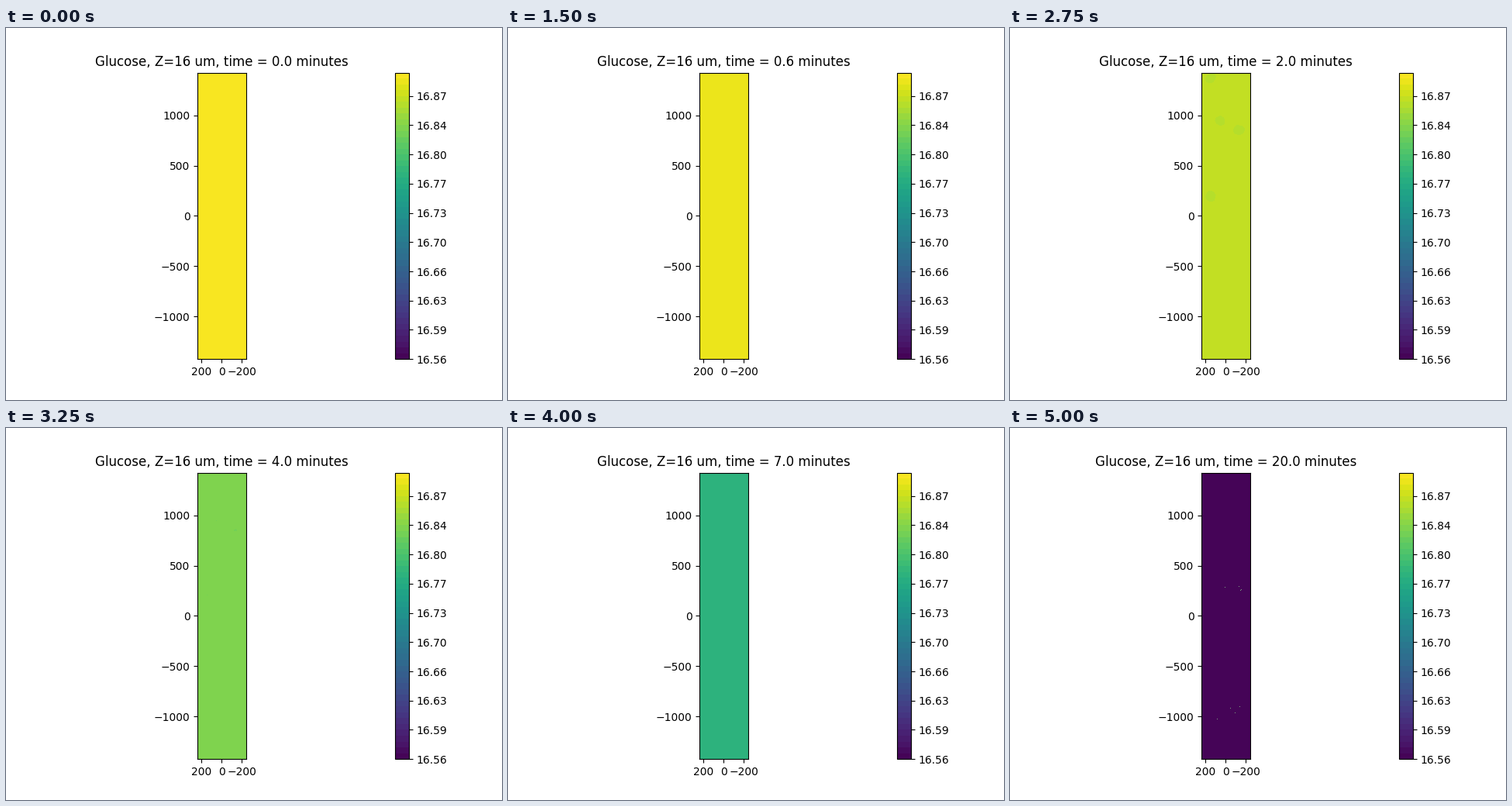
Animation, 640 px wide and 480 px high, one loop 5.25 s. Source, as a matplotlib script:

```python
import numpy as np
import matplotlib.pyplot as plt
from matplotlib.animation import FuncAnimation
from matplotlib.cm import ScalarMappable
from matplotlib.colors import Normalize

plt.rcParams["text.kerning_factor"] = 6  # whole-pixel kerning

LOW, HIGH, BANDS = 16.558, 16.899, 49
LEVELS = np.linspace(LOW, HIGH, BANDS + 1)
TIMES = [*np.arange(10) / 10, *range(1, 11), 20]

# Centres of 32 um voxels
HALF_X, HALF_Y = 240, 1424
X, Y = np.meshgrid(np.arange(-HALF_X, HALF_X + 1, 32),
                   np.arange(-HALF_Y, HALF_Y + 1, 32))
rng = np.random.default_rng(4)


def smooth_noise(passes):
    z = rng.normal(size=X.shape)
    for _ in range(passes):
        for axis in (0, 1):
            z = (np.roll(z, 1, axis) + 2 * z + np.roll(z, -1, axis)) / 4
    return z / z.std()


def cluster(x, y):
    return np.exp(-((X - x) / 75) ** 2 - ((Y - y) / 70) ** 2)


# Cell clusters take up more glucose
uptake = sum(cluster(x, y) for x, y in
             [(140, 1360), (60, 940), (-120, 860), (150, 190)])
uptake = 0.18 * uptake * (1 + 0.25 * smooth_noise(1))

# The upper half slowly falls behind, with a ragged front
front = 0.2 / (1 + np.exp(-(Y - 350 + 0.5 * X + 130 * smooth_noise(2)) / 80))


def field(t):
    z = BANDS - 2.45 * t + 0.002 * t ** 2
    z = z - uptake * min(t / 2, 1) ** 2 - front * (t / 9) ** 3
    return LOW + np.clip(z, 0.02, BANDS - 0.02) * (HIGH - LOW) / BANDS


fig, ax = plt.subplots(figsize=(6.4, 4.8), dpi=100)
shades = ScalarMappable(Normalize(LOW, HIGH), "viridis")
bar = fig.colorbar(shades, ax=ax, boundaries=LEVELS, ticks=LEVELS[::5],
                   format="%.2f")
bar.minorticks_off()
ax.set_aspect("equal", adjustable="box", anchor="C")

# Pinholes in two loose rows once the glucose is used up
rows = np.repeat([270, -950], 4)
specks, = ax.plot(rng.uniform(-165, 165, 8),
                  rows + rng.uniform(-1, 1, 8) * np.where(rows > 0, 25, 90),
                  ",", color="#7c9a80", zorder=3)
title = ax.set_title("")
layer = None


def update(i):
    global layer
    t = TIMES[i]
    if layer is not None:
        layer.remove()
    layer = ax.contourf(X, Y, field(t), levels=LEVELS, cmap="viridis",
                        vmin=LOW, vmax=HIGH)
    ax.set(xlim=(HALF_X, -HALF_X), ylim=(-HALF_Y, HALF_Y),
           xticks=[200, 0, -200], yticks=range(-1000, 1001, 500))
    specks.set_visible(t > 10)
    title.set_text(f"Glucose, Z=16 um, time = {t:.1f} minutes")
    return layer, title, specks


anim = FuncAnimation(fig, update, frames=len(TIMES), interval=250,
                     repeat=True, repeat_delay=0, blit=False)
plt.show()
```
